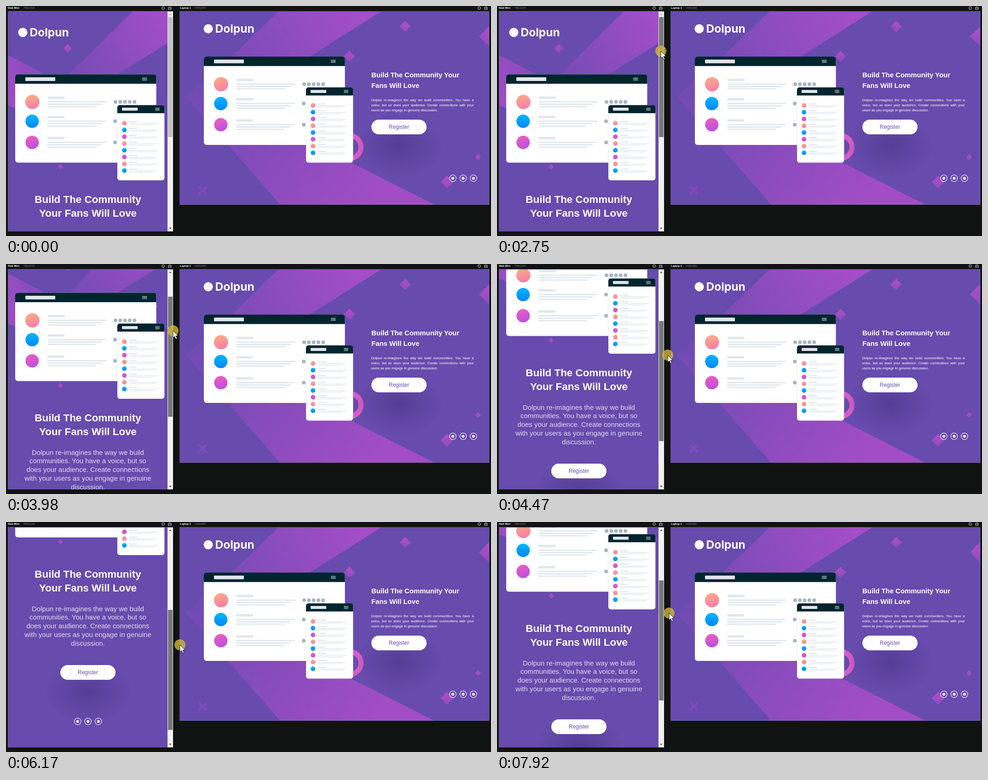
Animation, 1054 px wide and 500 px high, one loop 7.99 s. Source, as an HTML page:

```html
<!DOCTYPE html>
<html lang="en">
<head>
<meta charset="utf-8">
<title>Responsive preview</title>
<style>
  html, body { margin: 0; width: 100%; height: 100%; overflow: hidden; background: #111312; }
  svg { position: absolute; left: 0; top: 0; display: block; }
  text { font-family: "Liberation Sans", Arial, sans-serif; fill: #fff; }
  .brand { font: 700 24.5px Inter, sans-serif; }
  .bold { font-weight: 700; }
  .mid { text-anchor: middle; }
  .soft { fill: #e1dbef; }
  .label { font-size: 5.7px; }
  .dim { fill: #85898a; }
  #intro {
    position: absolute; left: 793.6px; top: 199.2px; width: 223px;
    font: 7.47px/11px "Liberation Sans", Arial, sans-serif;
    color: #e1dbef; -webkit-text-stroke: .2px #e1dbef;
  }
  #intro div { text-align: justify; text-align-last: justify; }
  #intro div:last-child { text-align-last: left; }
</style>
</head>
<body>
<svg width="1054" height="500" viewBox="0 0 1054 500">
  <defs>
    <linearGradient id="salmon" x1=".35" y1="0" x2=".65" y2="1">
      <stop offset=".1" stop-color="#fca688"/><stop offset=".95" stop-color="#f77fa9"/>
    </linearGradient>
    <linearGradient id="blue" x1="0" y1="0" x2="0" y2="1">
      <stop offset=".1" stop-color="#00b2ff"/><stop offset=".95" stop-color="#0088fb"/>
    </linearGradient>
    <linearGradient id="pink" x1=".35" y1="0" x2=".65" y2="1">
      <stop offset=".1" stop-color="#e65cc1"/><stop offset=".95" stop-color="#bd4fe2"/>
    </linearGradient>
    <linearGradient id="gem" x1="0" y1="0" x2="0" y2="1">
      <stop offset="0" stop-color="#b04fc4"/><stop offset="1" stop-color="#8f4cc0"/>
    </linearGradient>
    <linearGradient id="bandTop" gradientUnits="userSpaceOnUse" x1="770" y1="10" x2="450" y2="200">
      <stop offset="0" stop-color="#a44ec8"/><stop offset="1" stop-color="#704bb1"/>
    </linearGradient>
    <linearGradient id="bandLow" gradientUnits="userSpaceOnUse" x1="790" y1="440" x2="480" y2="190">
      <stop offset="0" stop-color="#a24dc6"/><stop offset="1" stop-color="#744bb4"/>
    </linearGradient>
    <linearGradient id="bandLeft" gradientUnits="userSpaceOnUse" x1="350" y1="15" x2="140" y2="160">
      <stop offset="0" stop-color="#a44ec8"/><stop offset="1" stop-color="#744bb4"/>
    </linearGradient>
    <linearGradient id="wedge" gradientUnits="userSpaceOnUse" x1="5" y1="170" x2="95" y2="140">
      <stop offset="0" stop-color="#9b4dc4"/><stop offset="1" stop-color="#824bba"/>
    </linearGradient>
    <radialGradient id="shade">
      <stop offset="0" stop-color="#493585" stop-opacity=".6"/>
      <stop offset=".5" stop-color="#493585" stop-opacity=".28"/>
      <stop offset="1" stop-color="#493585" stop-opacity="0"/>
    </radialGradient>
    <clipPath id="leftClip"><rect x="5" y="12" width="346" height="478"/></clipPath>
    <clipPath id="rightClip"><rect x="378" y="12" width="672" height="420"/></clipPath>
    <path id="diamond" d="M0-1L1 0 0 1-1 0Z" fill="url(#gem)"/>
    <g id="mock"></g>
    <g id="logo">
      <circle cx="439.5" cy="49.5" r="10" fill="#fff"/>
      <text class="brand" x="454.5" y="58">Dolpun</text>
    </g>
    <g id="button">
      <ellipse cx="1" cy="42" rx="95" ry="68" fill="url(#shade)"/>
      <rect x="-60" y="-16" width="120" height="32" rx="16" fill="#fff"/>
      <text class="mid" y="4.2" style="font-size:11.95px;fill:#674bad">Register</text>
    </g>
    <g id="social" fill="none" stroke="#fff"></g>
    <g id="tools" fill="none" stroke="#747a7c">
      <circle r="2.5" stroke-width="1.6"/>
      <circle r="3.6" stroke-width="1" stroke-dasharray="1.4 1.43"/>
      <path d="M11 -1.8h1.5l.8-1.2h2.2l.8 1.2h1.5v5h-7z" fill="#747a7c"/>
      <circle cx="14.4" cy=".6" r="1.4" stroke="#111312" stroke-width=".8"/>
    </g>
  </defs>

  <text class="label bold" x="4" y="6.3">Slab Mini</text>
  <text class="label dim" x="37.5" y="6.3">768x1024</text>
  <text class="label bold" x="378" y="6.3">Laptop 1</text>
  <text class="label dim" x="409.5" y="6.3">1440x900</text>
  <use href="#tools" x="341.5" y="4.5"/>
  <use href="#tools" x="1028.5" y="4.5"/>

  <g clip-path="url(#rightClip)">
    <rect x="378" y="12" width="672" height="420" fill="#674bad"/>
    <path d="M390 197L490 110 592 12H815L660 110 560 245Z" fill="url(#bandTop)"/>
    <path d="M390 197L490 205 755 343 931 432H596Z" fill="url(#bandLow)"/>
    <g id="gems"></g>
    <path d="M419.500 392.500l17 17m0-17l-17 17" stroke="#7f4abb" stroke-width="5"/>
    <circle cx="747" cy="306.500" r="24.500" fill="none" stroke="#d65dc7" stroke-width="11"/>
    <use href="#button" x="854" y="263"/>
    <use href="#mock"/>
    <use href="#logo"/>
    <text class="bold" style="font-size:14.93px" x="794" y="155">Build The Community Your</text>
    <text class="bold" style="font-size:14.93px" x="794" y="178">Fans Will Love</text>
    <use href="#social" x="993.5" y="374.5"/>
  </g>
  <rect x="377.500" y="11.500" width="672.500" height="420" fill="none" stroke="#9383c8" stroke-opacity=".55"/>

  <rect x="4.500" y="11.500" width="358" height="478" fill="#674bad" stroke="#9383c8" stroke-opacity=".55"/>
  <g clip-path="url(#leftClip)">
    <g id="page">
      <path d="M135 150L275 12H351V81L240 150Z" fill="url(#bandLeft)"/>
      <path d="M5 107L88 150V250L5 216Z" fill="url(#wedge)"/>
      <g id="pageGems"></g>
      <use href="#button" x="178" y="634"/>
      <use href="#mock" x="-410" y="38.600"/>
      <use href="#logo" x="-403" y="8"/>
      <g class="bold mid" style="font-size:22.4px">
        <text x="178" y="428">Build The Community</text>
        <text x="178" y="458">Your Fans Will Love</text>
      </g>
      <g id="blurb" class="mid" style="font-size:14.93px"></g>
      <use href="#social" x="178.2" y="740.5"/>
    </g>
  </g>

  <rect x="351" y="12" width="12" height="478" fill="#f1f1f1"/>
  <path id="up" d="M354 19.500l3-3 3 3z"/>
  <path d="M354 482l3 3 3-3z" fill="#505050"/>
  <rect id="thumb" x="352" y="24" width="10" height="261"/>
  <g id="pointer">
    <circle id="press" r="12" fill="#d2b93a" fill-opacity=".78"/>
    <path d="M0 0V15.500L3.500 12.300 6.200 18.300 8.700 17.200 6.100 11.300H11Z" fill="#fff" stroke="#111" stroke-width=".9"/>
  </g>
</svg>
<div id="intro">
  <div>Dolpun re-imagines the way we build communities. You have a</div>
  <div>voice, but so does your audience. Create connections with your</div>
  <div>users as you engage in genuine discussion.</div>
</div>
<script>
const $ = id => document.getElementById(id);
const paints = ['salmon', 'blue', 'pink'];
const bar = (x, y, w, h, fill, r = h / 2) =>
  `<rect x="${x}" y="${y}" width="${w}" height="${h}" rx="${r}" fill="${fill}"/>`;
const dot = (x, y, r, fill) => `<circle cx="${x}" cy="${y}" r="${r}" fill="${fill}"/>`;
const gem = (x, y, r) => `<use href="#diamond" transform="translate(${x} ${y}) scale(${r})"/>`;

// A window: white body, dark header, pill and menu icon
function frame(x, y, w, h, head, r, pill) {
  const mid = y + head / 2, right = x + w;
  let out = bar(x, y, w, h, '#fff', r) +
    `<path d="M${x} ${y + head}V${y + r}q0-${r} ${r}-${r}H${right - r}q${r} 0 ${r} ${r}V${y + head}z" fill="#00252e"/>` +
    bar(...pill, '#e0e6ee', 1);
  const menu = right - (w > 200 ? 30.5 : 20);
  for (let i = -1; i < 2; i++) out += bar(menu, mid - .5 + i * 2.4, w > 200 ? 10.5 : 9.5, 1, '#dfe6ec', 0);
  return out;
}

function mock() {
  let out = frame(430, 110, 306.5, 192, 20.5, 6, [452, 116.5, 65, 8]);
  [170, 212, 258].forEach((y, i) => {
    const x = i ? 500 : 501;
    out += dot(467.3 - (i ? .5 : 0), y, i ? 14.5 : 15.5, `url(#${paints[i]})`) +
      bar(x, y - 11.8, 37, 5, '#dfe7ee', 1.5);
    [128, 118, 106].forEach((w, k) => out += bar(x, y - 1.6 + k * 5.2, w, 2.8, '#dfe7ee'));
    for (let k = 0; k < 5; k++) out += dot(648 - (i ? 1 : 0) + k * 10.3, y, 4, '#a4b5c8');
  });
  out += bar(651.5, 176.5, 103.5, 164.5, '#5b4a8a', 6).replace('/>', ' opacity=".25"/>');
  out += frame(652, 177, 102.3, 163.5, 17.5, 5.5, [662, 182.5, 34, 6.5]);
  for (let i = 0; i < 8; i++) {
    const y = 216 + i * 14.72;
    out += dot(667.2, y, 5, `url(#${paints[i % 3]})`) +
      bar(677, y - 4, 18, 1.6, '#d6dfe8') +
      bar(677, y - .3, 64, 1, '#dde5ec') +
      bar(677, y + 1.8, 59, 1, '#dde5ec') +
      bar(677, y + 3.9, 53, 1, '#e6ecf1');
  }
  return out;
}

$('mock').innerHTML = mock();
$('social').innerHTML = [-22.4, 0, 22.4]
  .map(x => `<circle cx="${x}" r="7.2" stroke-width="1.1"/><circle cx="${x}" r="3" fill="#fff" stroke="none"/>`).join('');
$('gems').innerHTML = gem(867.5, 44.5, 12) + gem(1050, 66, 22) + gem(746.5, 109.5, 12) +
  gem(1026, 328.5, 6.5) + gem(958.5, 383, 14);
$('pageGems').innerHTML = gem(134, 92, 9.5) + gem(118, 350, 6) + gem(318, 178, 12);
$('blurb').innerHTML = [
  'Dolpun re-imagines the way we build',
  'communities. You have a voice, but so',
  'does your audience. Create connections',
  'with your users as you engage in genuine',
  'discussion.'
].map((s, i) => `<text class="soft" x="178" y="${500.7 + i * 18.75}">${s}</text>`).join('');

// Each move: start, end, steps, then pointer x, y and scroll reached
const LOOP = 7990;
const moves = [
  [590, 800, 4, 331, 96, 0],
  [1000, 1000, 1, 350, 94.5, 0],
  [1330, 1330, 1, 351, 95, 0],
  [2130, 2330, 3, 356, 98, 0],
  [3080, 3840, 12, 361, 130, 58],
  [3910, 4680, 12, 374, 220, 226],
  [4750, 5310, 9, 380, 263, 295],
  [5640, 5710, 2, 379, 266, 304],
  [6170, 6780, 10, 371, 277, 331],
  [7040, 7110, 2, 371, 278, 333],
  [7370, 7920, 9, 374, 198, 189]
];

function pose(t) {
  let at = [999, 477, 0];
  for (const [start, end, n, ...to] of moves) {
    if (t < start) break;
    const step = n > 1 ? (end - start) / (n - 1) : 1;
    const p = Math.min(n, Math.floor((t - start) / step + .15) + 1) / n;
    at = at.map((v, i) => v + (to[i] - v) * p);
  }
  return at;
}

function draw() {
  const t = performance.now() % LOOP;
  const [x, y, scroll] = pose(t);
  const held = t >= 2750;
  $('page').setAttribute('transform', `translate(0 ${-Math.round(scroll)})`);
  $('thumb').setAttribute('y', 24 + Math.round(scroll * .546));
  $('thumb').setAttribute('fill', held ? '#787878' : t >= 2130 ? '#a8a8a8' : '#c1c1c1');
  $('up').setAttribute('fill', scroll > 0 ? '#505050' : '#a3a3a3');
  $('pointer').setAttribute('transform', `translate(${Math.round(x)} ${Math.round(y)})`);
  $('pointer').setAttribute('visibility', t >= 590 ? 'visible' : 'hidden');
  $('press').setAttribute('visibility', held ? 'visible' : 'hidden');
  requestAnimationFrame(draw);
}
draw();
</script>
</body>
</html>
```
